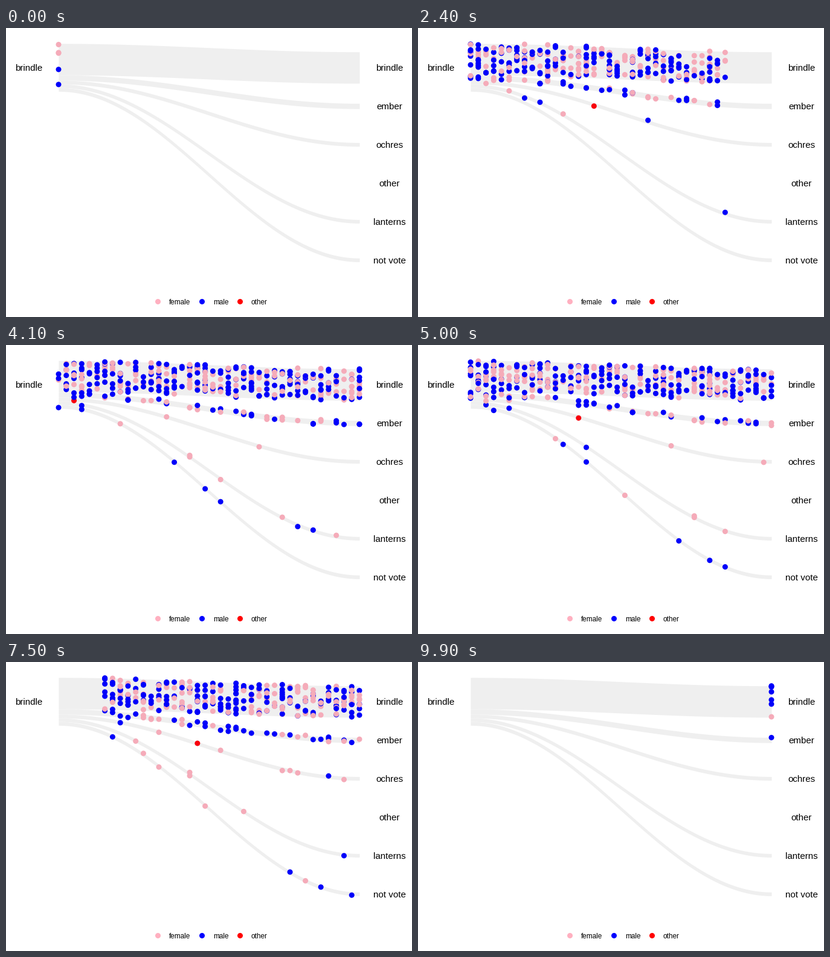
A matplotlib script for the animation above (10 s loop, 672 by 480 pixels).

```python
import numpy as np
import matplotlib.pyplot as plt
from matplotlib.animation import FuncAnimation

W, H, DPI = 672, 480, 96
FRAMES, INTERVAL = 100, 100
LAST_START, STEPS = 98, 39
X0, X1 = 87, 585
LABEL_GAP = 49.8
GRAY = "#EFEFEF"
PINK, BLUE, RED = range(3)
DOT_COLORS = np.array(["#F5ABB9", "#0000FA", "#F8000C"])
KEY_COLORS = ["#FFB0C0", "#0000FF", "#FF0000"]

# (left centre, right centre, half height) of each stream
BANDS = np.array([
    (51.9, 65.8, 26.1),
    (82.4, 129.7, 4.4),
    (89.9, 193.5, 3.1),
    (96.0, 321.3, 3.0),
    (102.2, 385.3, 3.1),
])
MAIN, SECOND, THIRD, FOURTH, FIFTH = range(5)

# Start ticks of the rare travellers
RARE = {
    (THIRD, PINK): (31, 43, 64, 67, 73, 74, 75, 83, 91),
    (THIRD, BLUE): (10, 69, 96),
    (THIRD, RED): (17, 55, 86),
    (FOURTH, PINK): (21, 28, 36, 40, 40, 80, 87, 87, 94),
    (FOURTH, BLUE): (0, 24, 26, 54, 64, 67),
    (FIFTH, PINK): (49, 58, 72, 85, 91, 93),
    (FIFTH, BLUE): (36, 38, 42, 54, 57, 66, 70, 74, 97),
}


def ease(u):
    return (1 - np.cos(np.pi * u)) / 2


def make_dots():
    """Return start tick, band, colour index and offset of every dot."""
    rng = np.random.default_rng(12)
    rows = [(s, band, sex) for (band, sex), starts in RARE.items()
            for s in starts]
    for band, count in ((MAIN, 836), (SECOND, 116)):
        # an even flow with some slack, wrapped so both ends stay as busy
        ticks = np.arange(count) * (LAST_START + 1) / count
        ticks = (ticks + rng.normal(0, 1.2, count)) % (LAST_START + 1)
        sexes = rng.choice([PINK, BLUE], count, p=[0.46, 0.54])
        rows += zip(ticks.astype(int), [band] * count, sexes)
    start, band, sex = rng.permutation(np.array(rows, dtype=int)).T
    offset = rng.uniform(-1, 1, len(start)) * BANDS[band, 2]
    return start, band, sex, offset


start, band, sex, offset = make_dots()

plt.rcParams["font.family"] = "Liberation Sans"
fig = plt.figure(figsize=(W / DPI, H / DPI), dpi=DPI, facecolor="white")
ax = fig.add_axes([0, 0, 1, 1])
ax.set(xlim=(0, W), ylim=(H, 0))
ax.axis("off")

u = np.linspace(0, 1, 200)
for left, right, half in BANDS:
    mid = left + (right - left) * ease(u)
    ax.fill_between(X0 + (X1 - X0) * u, mid - half, mid + half,
                    color=GRAY, linewidth=0)

names = ["brindle", "ember", "ochres", "other", "lanterns", "not vote"]
label = dict(fontsize=11.38, ha="center", va="baseline")
ax.text(X0 - LABEL_GAP, 71, names[0], **label)
for i, name in enumerate(names):
    ax.text(X1 + LABEL_GAP, 71 + 64 * i, name, **label)

dot_style = dict(s=(9 * 72 / DPI) ** 2, linewidths=0)
keys = [(250.97, "female"), (323.87, "male"), (386.95, "other")]
for (x, name), color in zip(keys, KEY_COLORS):
    ax.scatter([x], [453.8], color=color, **dot_style)
    ax.text(x + 18.85, 459, name, fontsize=8.8, va="baseline")

dots = ax.scatter([], [], zorder=3, **dot_style)


def update(frame):
    tick = np.ceil((frame - 0.5) * (LAST_START + STEPS) / (FRAMES - 1))
    step = tick - start
    on = (step >= 0) & (step <= STEPS)
    u = step[on] / STEPS
    left, right, _ = BANDS[band[on]].T
    y = left + (right - left) * ease(u) + offset[on]
    dots.set_offsets(np.column_stack([X0 + (X1 - X0) * u, y]))
    dots.set_facecolors(DOT_COLORS[sex[on]])
    return dots,


anim = FuncAnimation(fig, update, frames=FRAMES, interval=INTERVAL,
                     repeat=True, repeat_delay=0, blit=False)
plt.show()
```
